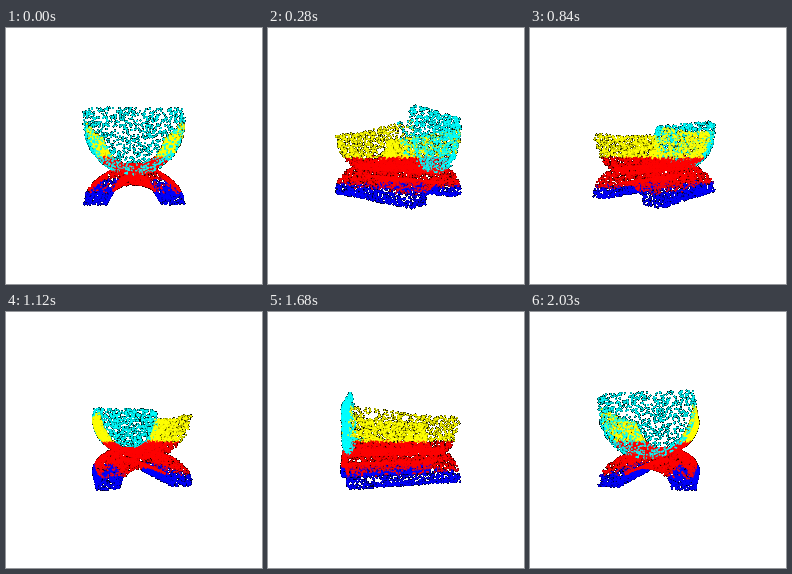
A matplotlib script for the animation above (2.1 s loop, 256 px wide and 256 px high).

```python
import numpy as np
import matplotlib.pyplot as plt
from matplotlib.animation import FuncAnimation

SIZE, FRAMES, INTERVAL = 256, 30, 70
DIST, FOCAL = 3.0, 128 / np.tan(np.pi / 6)
RADIUS = 1.28          # splat radius in pixels
LAYERS = 8             # splats blended per pixel
BACK, FRONT = -0.68, 0.65
WIDTH = 0.528
CYAN, YELLOW, RED, BLUE = (0, 1, 1), (1, 1, 0), (1, 0, 0), (0, 0, 1)

rng = np.random.default_rng(7)
uni = rng.uniform


def rim(z):
    """Height of the arm and back edge along the depth."""
    return (0.29 + 0.06 * np.clip((0.1 - z) / 0.7, 0, 1)
            + 0.16 * np.clip((-0.62 - z) / 0.06, 0, 1))


def trough(n, w, h):
    t, z = uni(-0.35, np.pi + 0.35, n), uni(BACK, FRONT, n)
    x, y = w * np.cos(np.clip(t, 0, np.pi)), 0.345 - h * np.sin(t)
    p = np.stack([x, y, z], 1)
    return p[y < rim(z)]


def panel(n):
    x, y, z = uni(-WIDTH, WIDTH, n), uni(-0.2, 0.51, n), uni(BACK, -0.64, n)
    depth = np.clip((0.345 - y) / 0.545, 0, 1)
    return np.stack([x, y, z], 1)[np.abs(x) < WIDTH * np.sqrt(1 - depth ** 2)]


def arch(n, k, z):
    """Arched base; k runs from the inner (0) to the outer (1) curve."""
    t = uni(0, np.pi, n)
    x = (0.29 + (WIDTH - 0.29) * k) * np.cos(t)
    y = -0.51 + (0.21 + 0.175 * k) * np.sin(t)
    return np.stack([x, y, z], 1)


def soles(n):
    x = uni(0.29, WIDTH, n) * rng.choice([-1, 1], n)
    return np.stack([x, np.full(n, -0.51), uni(BACK, FRONT, n)], 1)


def by_height(p):
    y = p[:, 1] + rng.normal(0, 0.01, len(p))
    color = np.where((y > -0.02)[:, None], YELLOW, RED)
    color[y < -0.385] = BLUE
    return color


def paint_trough(p, outer):
    x, y, z = p.T
    color = by_height(p)
    rear = z < -0.6 + 0.1 * (y > 0)
    color[rear & ((y > 0.36) | (y < 0.03)) & (y > -0.17)] = CYAN
    if outer:
        patch = (np.abs(z + 0.63) < 0.03) & (y > 0.07) & (y < 0.22)
        color[(rear & (x > 0) & (y > 0)) | (patch & (x < 0))] = CYAN
    return color


shell = trough(2450, WIDTH, 0.545)
seat = trough(1750, 0.50, 0.50)
back = panel(1100)
base = np.concatenate([
    arch(1600, np.ones(1600), uni(BACK, FRONT, 1600)),
    arch(1050, np.zeros(1050), uni(BACK, FRONT, 1050)),
    arch(500, uni(0, 1, 500), rng.choice([BACK, FRONT], 500)),
    soles(450),
])
points = np.concatenate([shell, seat, back, base])
colors = np.concatenate([
    paint_trough(shell, True),
    paint_trough(seat, False),
    np.tile(CYAN, (len(back), 1)),
    by_height(base),
]).astype(float)
DX, DY = (g.ravel() for g in np.meshgrid([-1, 0, 1], [-1, 0, 1]))


def render(angle):
    x, y, z = points.T
    s, c = np.sin(angle), np.cos(angle)
    depth = DIST - x * s - z * c
    u = SIZE / 2 + FOCAL * (x * c - z * s) / depth
    v = SIZE / 2 - FOCAL * y / depth

    col = np.floor(u)[:, None] + DX
    row = np.floor(v)[:, None] + DY
    d2 = (col + 0.5 - u[:, None]) ** 2 + (row + 0.5 - v[:, None]) ** 2
    which, cell = np.nonzero(d2 < RADIUS ** 2)
    weight = 1 - d2[which, cell] / RADIUS ** 2
    pixel = (row * SIZE + col)[which, cell].astype(int)

    # nearest splat first within each pixel
    order = np.lexsort((depth[which], pixel))
    which, weight, pixel = which[order], weight[order], pixel[order]
    _, start, count = np.unique(pixel, return_index=True, return_counts=True)
    rank = np.arange(len(pixel)) - np.repeat(start, count)

    image = np.ones((SIZE * SIZE, 3))
    image[pixel] = 0
    clear = np.ones(SIZE * SIZE)
    for layer in range(LAYERS):
        m = rank == layer
        px, w = pixel[m], weight[m]
        image[px] += (clear[px] * w)[:, None] * colors[which[m]]
        clear[px] *= 1 - w
    return image.reshape(SIZE, SIZE, 3).clip(0, 1)


fig = plt.figure(figsize=(SIZE / 100, SIZE / 100), dpi=100, facecolor="white")
ax = fig.add_axes([0, 0, 1, 1])
ax.axis("off")
view = ax.imshow(np.ones((SIZE, SIZE, 3)), interpolation="nearest", aspect="auto")


def update(i):
    view.set_data(render(np.radians(180 - 360 * i / FRAMES)))
    return [view]


anim = FuncAnimation(fig, update, frames=FRAMES, interval=INTERVAL,
                     repeat=True, repeat_delay=0, blit=False)
plt.show()
```
